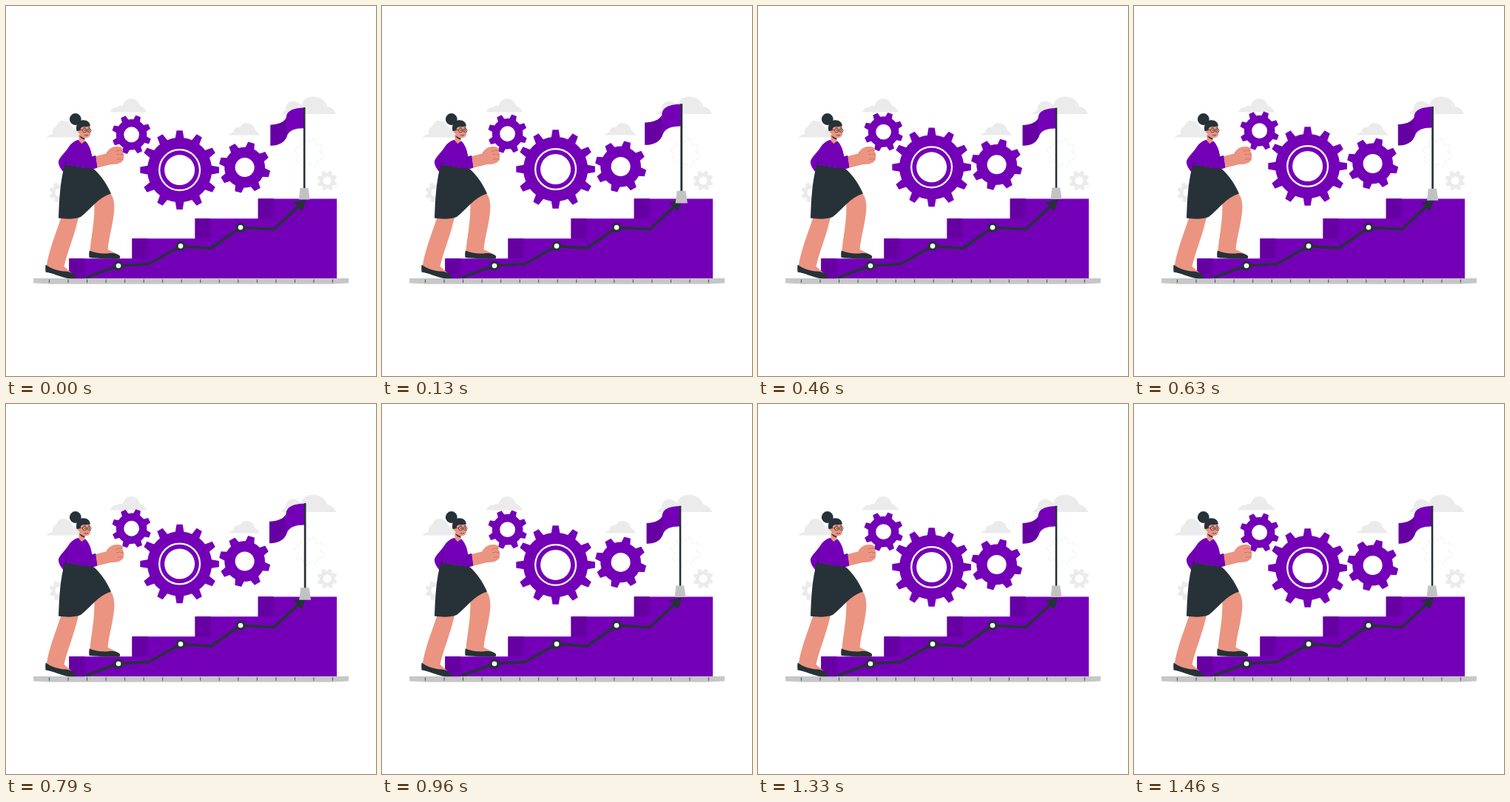
Recreate the animation shown at these times as an HTML page. Size 500x500 px, loop 1500 ms.

```html
<!DOCTYPE html>
<html lang="en">
<head>
<meta charset="utf-8">
<title>Climbing the steps</title>
<style>
html, body { margin: 0; width: 100%; height: 100%; overflow: hidden; background: #fff; }
svg { display: block; width: 100vw; height: 100vh; }
.main { fill: #7300b7; }
.deep { fill: #6600a2; }
.ink { fill: #263238; }
.skin { fill: #eb9481; }
.pale { fill: #ebebeb; }
.line { fill: none; stroke: #263238; }
</style>
</head>
<body>
<svg viewBox="0 0 500 500">
  <defs>
    <pattern id="dots" width="4.6" height="4.6" patternUnits="userSpaceOnUse" patternTransform="rotate(12)">
      <circle cx="1.1" cy="1.1" r=".5" fill="#b56be0"/>
      <circle cx="3.4" cy="3.4" r=".5" fill="#b56be0"/>
    </pattern>
  </defs>

  <g class="pale">
    <path d="M54.5 177.5C57 175 60 173.500 63 173C62 167 65 163.500 68 163C70 157 74 154.500 78 155C84 155.500 88 160 90 165C95 166 99 171 103 177.500Z"/>
    <path d="M141 143.500C142 139 146 136 151 136.500C153 134.500 156 134.500 157.500 135.500C159 129 164 125 169 125C175 125 179 129 181 134.500C185 136 188 139 190 143.500Z"/>
    <path d="M301 174.500C303 172 305 171 308 170.500C307.500 166 311 163 315.500 164C318 160 321 158 325 158C331 158 335 162 336.500 167.500C339 169 341 171 343 174.500Z"/>
    <path d="M372 146C373 143 375 141.500 378 141C377 135 381 129 387 128.500C392 128 396 131 399 134C401 126 408 122.500 415 122.500C424 122.500 432 128 434 136C440 136.500 444 141 446 146Z"/>
  </g>
  <path id="ghost" fill="#fff" stroke="#f0f0f0" stroke-dasharray="7 2"/>
  <path id="greyRight" class="pale" fill-rule="evenodd"/>
  <path id="greyLeft" class="pale" fill-rule="evenodd"/>

  <path fill="#c7c7c7" d="M37 368H463V374.500L440 375.700H60L37 374.500Z"/>
  <path id="ticks" class="line" stroke-width="1" opacity=".8"/>

  <path class="main" d="M85.300 368V341.200H170.400V314.200H255.500V287.200H340.700V260.400H447V368Z"/>
  <path id="sides" class="deep"/>
  <path class="line" stroke-width="3.600" stroke-linejoin="round" d="M108 366.800L152 351L193 348.800L236 324.400L277 327.200L317 299.300L362 301.800L397 269"/>
  <path class="ink" d="M405.500 261.500L400 277.800L388.300 265.500Z"/>
  <g id="knots"></g>

  <g id="flag">
    <path class="deep" d="M357.500 161C367 160.500 376 158 378.800 151L380 174C378 185 368 189 357.500 188.800Z"/>
    <path class="main" d="M402.300 138C390 138.500 378.500 141 378.800 152V180C380.500 168 390 165.500 402.300 165.500Z"/>
    <path class="line" stroke-width="2.600" d="M403 137.600V247"/>
    <path fill="#c2c2c2" d="M397.400 245.500H408.200L410.500 261H395.500Z"/>
  </g>

  <g id="gears">
    <path id="small" class="main" fill-rule="evenodd"/>
    <path id="big" class="main" fill-rule="evenodd"/>
    <circle cx="234.600" cy="221.700" r="27.400" fill="none" stroke="#fff" stroke-width="2.300"/>
    <path id="medium" class="main" fill-rule="evenodd"/>
  </g>

  <g id="woman">
    <path class="skin" d="M75 284C68 306 58 330 55 350L60 357L86 363L89 361L78.500 352C82 334 93 310 98.500 283Z"/>
    <path class="ink" d="M53.700 349.500C60 354.500 70 358 78.500 358.500C85 358.500 91.500 361 93.500 364.500Q94.500 367.700 92 368H84C76 367 63 361 53.500 359.500Q52.700 354 53.700 349.500Z"/>
    <path class="skin" d="M119 262C121 288 115 310 113.500 331L119 336L148 337L149 334.500L137.500 329C139 311 147 287 146.300 270C146 260 143 254 138 250Z"/>
    <path class="ink" d="M112.700 330.500C120 333.500 128 335 137 334.500C145 333 152 335 154 338Q154.800 341.300 152 341.500H136C127 341 120 340.500 112.500 340Q111.700 335 112.700 330.500Z"/>
    <path class="skin" d="M121 203L135 199.500C138 194 143 190 149 190C154 189.500 158 191.500 158 193.500L157 196C160 199 159.500 204 158.500 208C156 213 149 214 142 214L122 219Z"/>
    <path fill="none" stroke="#c76f5f" stroke-width=".8" d="M157.500 195.500Q152 194 148 196.500M158.500 201Q153 199.500 149 201M158.500 207Q153 206.500 150 207.500"/>
    <path id="blouse" class="main" d="M98 181C91 183 87 187 84 192C79 199 73 204 71 210C71 215 74 220 77.500 224L80 215L117 220.500L123.200 218.500L121 202L116 203.500C115 195 112 187 107 182.500L102 186Z"/>
    <use href="#blouse" style="fill:url(#dots)"/>
    <path fill="none" stroke="#4f0080" stroke-width=".8" d="M83 199Q80 207 81 215M116 203.500L114 211"/>
    <path class="ink" d="M79.500 214.500C91 216.500 106 219 117.500 219.500C128 228 136 240 142 253.500C124 259 115 274 101 285C93 288.500 80 288 71 286.500C72 262 73 237 79.500 214.500Z"/>

    <path class="skin" d="M98.500 174L98.500 182L102.500 186L106.500 182V176Z"/>
    <path class="ink" d="M99 175.500Q102 180 106.500 180.500L105.500 177Z"/>
    <path class="skin" d="M98 164C99 159 106 157.500 112 161C115 165 115 171 113.500 175C111.500 179.500 104 179 101 176C98.500 173 97.500 168 98 164Z"/>
    <circle class="ink" cx="93.800" cy="153" r="7.900"/>
    <path class="ink" d="M95.300 168.500C94 161 97 155.500 103 154.300C109 153.500 113.500 156.500 114 162.500C109 163.500 104.500 162 102 164C100.500 166 100.500 168.500 98.500 170Z"/>
    <circle class="skin" cx="98.700" cy="170" r="1.700"/>
    <g class="line" stroke-width=".7">
      <circle cx="106.200" cy="168.300" r="2.700"/>
      <circle cx="112.500" cy="168.300" r="2.500"/>
      <path d="M98.500 167L103.500 167.800M109 168H110M105 164.500L108 164M111 164.200L113.500 164.800M106 174.500Q109 176 111 174.300"/>
    </g>
    <circle class="ink" cx="106.800" cy="168.300" r=".8"/>
    <circle class="ink" cx="112.500" cy="168.300" r=".8"/>
  </g>
</svg>
<script>
const $ = id => document.getElementById(id);
const LOOP = 1500, LEAD = 15;

// Gear outline: root radius, tip radius, half widths of a tooth at root and tip
function gear(id, cx, cy, teeth, root, tip, wide, narrow, hole, turn) {
  const at = (r, off, a) => {
    const x = cx + r * Math.cos(a) - off * Math.sin(a);
    const y = cy + r * Math.sin(a) + off * Math.cos(a);
    return x.toFixed(2) + ' ' + y.toFixed(2);
  };
  const foot = Math.sqrt(root * root - wide * wide);
  let d = '';
  for (let i = 0; i < teeth; i++) {
    const a = turn * Math.PI / 180 + i * 2 * Math.PI / teeth;
    d += (i ? `A${root} ${root} 0 0 1 ` : 'M') + at(foot, -wide, a) +
      'L' + at(tip, -narrow, a) + 'L' + at(tip, narrow, a) + 'L' + at(foot, wide, a);
  }
  d += `A${root} ${root} 0 0 1 ` + at(foot, -wide, turn * Math.PI / 180) + 'Z';
  if (hole) d += `M${cx - hole} ${cy}a${hole} ${hole} 0 1 0 ${2 * hole} 0a${hole} ${hole} 0 1 0 ${-2 * hole} 0Z`;
  $(id).setAttribute('d', d);
}

gear('big', 234.6, 221.7, 12, 43.6, 53.3, 5.8, 4.1, 20.5, 0);
gear('medium', 322.6, 218.2, 8, 27.4, 34.5, 6, 4.5, 13, 15);
gear('small', 169.6, 173.9, 8, 20.8, 26.5, 4.6, 3.5, 10.4, 20);
gear('greyRight', 434, 236, 8, 10.4, 13.6, 2.7, 2, 5.6, 20);
gear('greyLeft', 72, 252, 8, 10.4, 13.6, 2.7, 2, 5.6, 20);
gear('ghost', 410, 199, 8, 15, 19.5, 4, 3, 0, 15);

let ticks = '', sides = '';
for (let i = 0; i < 16; i++) ticks += `M${58.5 + i * 25.53} 369.500V374`;
for (let i = 0; i < 4; i++) sides += `M${85.3 + i * 85.13} ${341.2 - i * 26.95}h21v27h-21Z`;
$('ticks').setAttribute('d', ticks);
$('sides').setAttribute('d', sides);
$('knots').innerHTML = [[152, 351], [236, 324.4], [317, 299.3]].map(([x, y]) =>
  `<circle class="ink" cx="${x}" cy="${y}" r="6.600"/><circle cx="${x}" cy="${y}" r="3.300" fill="#fff"/>`).join('');

// Double beat: quick rise, slow fall, rest, then a short second pulse
function beat(p) {
  if (p < .1) return p / .1;
  if (p < .3) return (.3 - p) / .2;
  return Math.max(0, 1 - Math.abs(p - .5) / .1);
}

function draw(ms) {
  const p = ((ms + LEAD) % LOOP) / LOOP;
  const lift = 6.1 * (1 - Math.abs(2 * p - 1));
  const scale = 1 + .093 * beat(p);
  $('gears').setAttribute('transform', `translate(0 ${-lift})`);
  $('flag').setAttribute('transform', `translate(384 199.2) scale(${scale}) translate(-384 -199.2)`);
}

let start;
function tick(now) {
  if (start === undefined) start = now;
  draw(now - start);
  requestAnimationFrame(tick);
}
draw(0);
requestAnimationFrame(tick);
</script>
</body>
</html>
```
